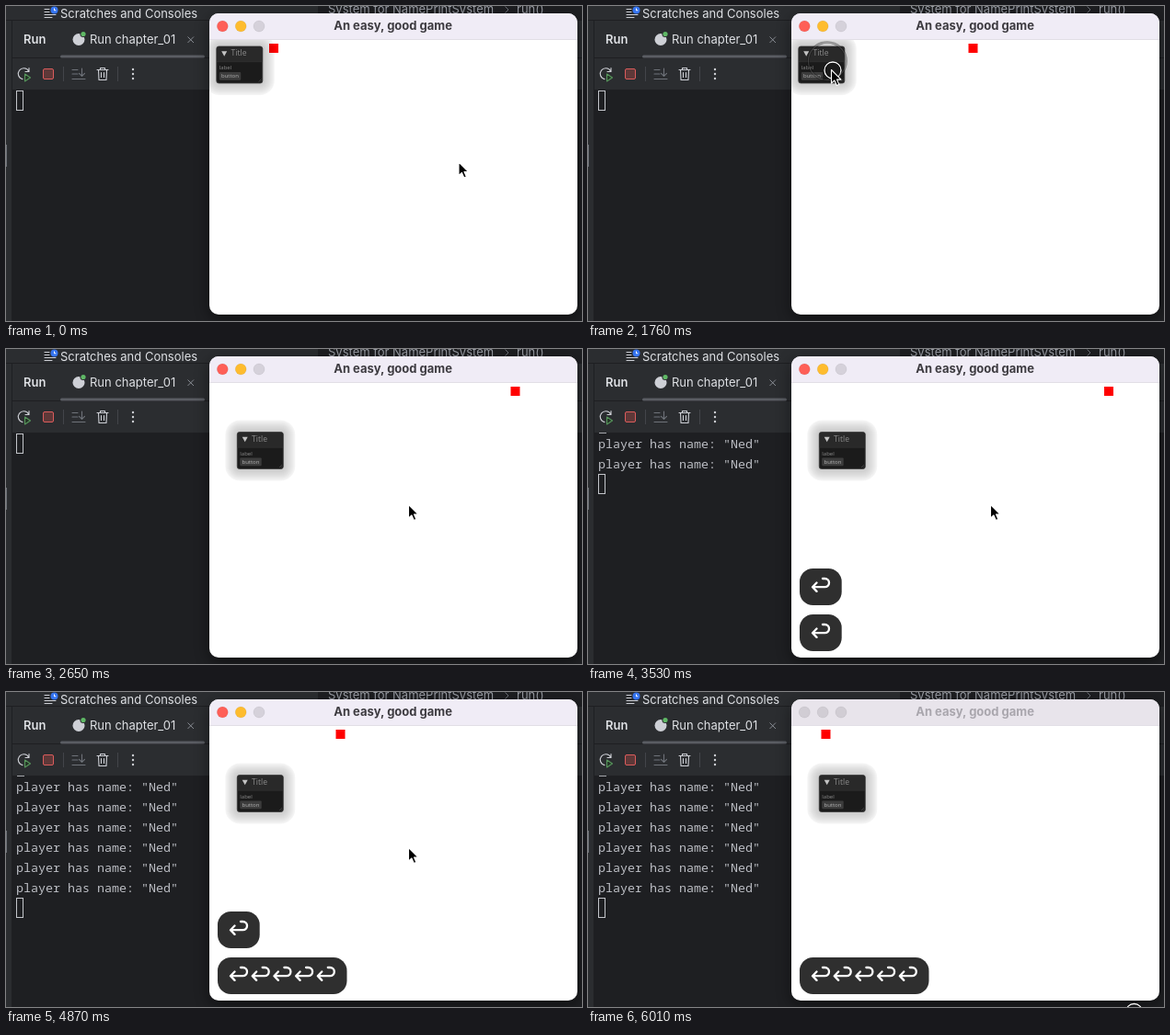
An HTML page for the animation above (6.03 s loop, 626 px wide and 343 px high).

```html
<!DOCTYPE html>
<html lang="en">
<head>
<meta charset="utf-8">
<title>An easy, good game</title>
<style>
html, body { margin: 0; width: 100%; height: 100%; overflow: hidden; background: #1e1f22; }
svg { display: block; width: 626px; height: 343px; }
text { font-family: Inter, "Open Sans", sans-serif; font-size: 13px; white-space: pre; }
.mono { font-family: "Noto Sans Mono", "DejaVu Sans Mono", monospace; font-size: 13.33px; fill: #bcbec4; }
.ui { font-family: "Open Sans", "Noto Sans", sans-serif; fill: #8c8c8c; }
.line { fill: none; stroke: #ced0d6; stroke-width: 1.1; stroke-linecap: round; stroke-linejoin: round; }
</style>
</head>
<body>
<svg viewBox="0 0 626 343" xmlns="http://www.w3.org/2000/svg">
  <defs>
    <clipPath id="content"><path d="M221 37H621V326a10 10 0 0 1-10 10H231a10 10 0 0 1-10-10Z"/></clipPath>
    <clipPath id="frame"><rect x="221" y="8" width="400" height="328" rx="10"/></clipPath>
    <filter id="soft" x="-10%" y="-10%" width="120%" height="125%"><feGaussianBlur stdDeviation="8"/></filter>
    <path id="return" class="key" d="M-4.5 -3L-9 1.7L-4.5 6.4M-8.4 1.7H4.4a4.6 4.6 0 0 0 0-9.2H2"
      fill="none" stroke="#fff" stroke-width="2.3" stroke-linecap="round" stroke-linejoin="round"/>
  </defs>

  <!-- IDE -->
  <rect width="626" height="343" fill="#1e1f22"/>
  <rect width="6" height="343" fill="#2b2d30"/>
  <rect width="339" height="15" fill="#2b2d30"/>
  <rect x="7" y="16" width="619" height="75" fill="#2b2d30"/>
  <rect y="15" width="626" height="1" fill="#1e1f22"/>
  <rect x="7" y="56" width="619" height="1" fill="#1e1f22"/>
  <rect y="151" width="1" height="24" fill="#6f737a"/>
  <g class="line">
    <path d="M42 3.5H47M42 6.5H47M42 9.5H54M42 12.5H50"/>
  </g>
  <circle cx="52.5" cy="4.5" r="4" fill="#3574f0"/>
  <path d="M52.5 2.5V4.8H54.3" fill="none" stroke="#fff"/>
  <text x="59" y="13" fill="#dfe1e5">Scratches and Consoles</text>
  <text x="350" y="7.5" fill="#9da0a8">System for NamePrintSystem</text>
  <path d="M542.5 .5L546 4L542.5 7.5" fill="none" stroke="#6f737a"/>
  <text x="555" y="7.5" fill="#9da0a8">run()</text>

  <text x="19" y="41" font-weight="600" fill="#dfe1e5">Run</text>
  <circle cx="79" cy="36.5" r="6.5" fill="#ced0d6"/>
  <circle cx="84" cy="30.5" r="3.6" fill="#2b2d30"/>
  <circle cx="84" cy="30.5" r="2.6" fill="#5fb865"/>
  <text x="91" y="41" fill="#dfe1e5">Run chapter_01</text>
  <path d="M197.5 33.5L204 40M204 33.5L197.5 40" stroke="#868a91" fill="none"/>
  <rect x="59" y="53.5" width="157" height="3" rx="1.5" fill="#5a5d63"/>

  <path class="line" d="M18 79.6A6 6 0 1 1 24.6 71M25 67.5V71.5H21"/>
  <path d="M20.5 74L26.5 78L20.5 82Z" fill="#253627" stroke="#57965c" stroke-width="1.1" stroke-linejoin="round"/>
  <rect x="40.5" y="68.5" width="11" height="11" rx="1.5" fill="#5e3838" stroke="#db5c5c"/>
  <path d="M62.5 66V82M121.5 66V82" stroke="#43454a"/>
  <path class="line" style="stroke:#6f737a" d="M72 69.5H78M72 74H78M72 79.5H86M82.5 68V76M79.5 73.3L82.5 76.3L85.5 73.3"/>
  <path class="line" d="M99 69.5H111M102.5 69.5V67.5H107.5V69.5M100.5 69.5L101 80.5H109L109.500 69.5M103.500 72.500V77.500M106.500 72.500V77.500"/>
  <g fill="#ced0d6"><circle cx="138" cy="69" r="1.2"/><circle cx="138" cy="74" r="1.2"/><circle cx="138" cy="79" r="1.2"/></g>
  <rect id="scrap" x="12" y="91" width="8" height="1" fill="#a5a7ac"/>
  <g id="log"></g>
  <rect id="caret" x="11.5" width="7" height="21" fill="none" stroke="#c4c6cb"/>

  <!-- game window -->
  <rect x="221" y="12" width="400" height="328" rx="10" fill="#000" opacity=".5" filter="url(#soft)"/>
  <g clip-path="url(#frame)">
    <rect x="221" y="8" width="400" height="328" fill="#fff"/>
    <rect id="bar" x="221" y="8" width="400" height="28.500"/>
    <rect x="221" y="36" width="400" height="1" fill="#e2dfe6"/>
  </g>
  <g id="lights" stroke="#000" stroke-opacity=".1" stroke-width=".6">
    <circle cx="235.300" cy="22" r="6"/><circle cx="255.200" cy="22" r="6"/><circle cx="275" cy="22" r="6"/>
  </g>
  <text id="title" x="420.600" y="26" font-weight="700" text-anchor="middle">An easy, good game</text>
  <g clip-path="url(#content)">
    <rect id="player" y="41" width="10" height="10" fill="#f00"/>
    <g id="panel">
      <g id="glow"></g>
      <rect x="228.800" y="44" width="50" height="40" rx="2.500" fill="#1b1b1b" stroke="#3a3a3a" stroke-width=".8"/>
      <path d="M229.200 60.500V46.500a2 2 0 0 1 2-2H276.400a2 2 0 0 1 2 2V60.500Z" fill="#292929"/>
      <path d="M229 60.700H278.500" stroke="#363636" stroke-width=".7"/>
      <path d="M234.200 49.300H240.200L237.200 54.700Z" fill="#c4c4c4"/>
      <text class="ui" x="244.500" y="54.400" style="font-size:8.600px">Title</text>
      <text class="ui" x="231.800" y="69.300" style="font-size:6px">label</text>
      <rect x="231.800" y="72" width="23.400" height="8.800" rx="1" fill="#3c3c3c"/>
      <text class="ui" x="234" y="78.400" style="font-size:6px;fill:#b4b4b4">button</text>
      <path d="M274.500 82.500L277.500 79.500M276.200 82.500L277.500 81.200" stroke="#555" stroke-width=".6"/>
    </g>
  </g>

  <!-- key and mouse overlays -->
  <g id="upper" transform="translate(230 239)"></g>
  <g id="lower" transform="translate(230 289)"></g>
  <g id="rings"></g>
  <path id="mouse" d="M0 0V14.600L3.400 11.500L5.800 17L8.300 15.900L6 10.600H10.500Z" fill="#000" stroke="#fff"
    stroke-width="1.100" stroke-linejoin="round"/>
</svg>
<script>
const LOOP = 6030;
const ticks = [0, 150, 290, 440, 590, 730, 880, 1030, 1170, 1320, 1470, 1610, 1760, 1910, 2060, 2210, 2360,
  2500, 2650, 2800, 2940, 3090, 3240, 3380, 3530, 3680, 3830, 3980, 4130, 4280, 4430, 4580,
  4730, 4870, 5020, 5170, 5320, 5470, 5610, 5760, 6010];
const playerPath = [[0, 286], [55, 286], [490, 221], [1030, 301], [1760, 413.5], [2650, 548.5],
  [3130, 621], [3530, 561], [4870, 358.5], [5785, 221], [6010, 253.5]];
const mousePath = [[0, 492, 170], [440, 492, 170], [730, 360, 92], [1030, 269, 28], [1170, 262, 20],
  [1320, 259, 38], [1610, 259, 59], [1760, 264.5, 69.5], [2060, 287, 116], [2360, 437.500, 169.500],
  [5320, 437.500, 169.500], [5610, 505, 250], [5760, 576, 332], [6010, 592, 348]];
const panelPath = [[1760, 0, 0], [2060, 22.500, 46.500]];
const presses = [2940, 3530, 3830, 4130, 4430, 4730];

const $ = id => document.getElementById(id);
const set = (el, attrs) => { for (const k in attrs) el.setAttribute(k, attrs[k]); };
const show = (el, on) => { el.style.display = on ? "" : "none"; };

function add(parent, tag, attrs) {
  const el = document.createElementNS("http://www.w3.org/2000/svg", tag);
  set(el, attrs);
  parent.appendChild(el);
  return el;
}

function along(path, t) {
  if (t <= path[0][0]) return path[0].slice(1);
  for (let i = 1; i < path.length; i++) {
    const a = path[i - 1], b = path[i];
    if (t <= b[0]) {
      const k = (t - a[0]) / (b[0] - a[0]);
      return a.slice(1).map((v, j) => v + (b[j + 1] - v) * k);
    }
  }
  return path[path.length - 1].slice(1);
}

for (let d = 13; d > 0; d--) {
  add($("glow"), "rect", { x: 228.8 - d, y: 44 - d, width: 50 + 2 * d, height: 40 + 2 * d,
    rx: 3 + d, fill: "#000", "fill-opacity": d === 13 ? 0.045 : 0.016 });
}

const lines = presses.map((_, i) => {
  const el = add($("log"), "text", { class: "mono", x: 11, y: 108 + 22 * i });
  el.textContent = 'player has name: "Ned"';
  return el;
});

function makeKeys(group, max) {
  const box = add(group, "rect", { height: 40, rx: 14.5, fill: "#2f2f2f" });
  const marks = Array.from({ length: max }, (_, i) =>
    add(group, "use", { href: "#return", x: 23 + 23.7 * i, y: 18.5 }));
  return (count, alpha = 1) => {
    show(group, count > 0 && alpha > 0);
    group.setAttribute("opacity", alpha);
    box.setAttribute("width", 45.7 + 23.7 * Math.max(0, count - 1));
    marks.forEach((m, i) => show(m, i < count));
  };
}
const drawUpper = makeKeys($("upper"), 1);
const drawLower = makeKeys($("lower"), 5);

function makeRing() {
  const g = add($("rings"), "g", { fill: "none" });
  const dark = add(g, "circle", { stroke: "#000", "stroke-opacity": 0.6, "stroke-width": 2.6 });
  const light = add(g, "circle", { stroke: "#fff", "stroke-width": 1.3 });
  return (on, x, y, r, alpha) => {
    show(g, on);
    g.setAttribute("opacity", alpha);
    for (const c of [dark, light]) set(c, { cx: x, cy: y, r });
    light.setAttribute("stroke-opacity", r > 12 ? 0.25 : 1);
  };
}
const drawPress = makeRing(), drawRelease = makeRing();

function draw(t) {
  const [mx, my] = along(mousePath, t);
  $("player").setAttribute("x", along(playerPath, t)[0]);
  $("mouse").setAttribute("transform", `translate(${mx} ${my})`);
  $("panel").setAttribute("transform", `translate(${along(panelPath, t)})`);

  const n = presses.filter(p => p <= t).length;
  lines.forEach((el, i) => show(el, i < n));
  show($("scrap"), n > 0);
  $("caret").setAttribute("y", 92.5 + 22 * n);
  drawUpper(n > 1 ? 1 : 0, Math.max(0, Math.min(1, (5320 - t) / 300)));
  drawLower(n > 1 ? n - 1 : n);

  const held = (t >= 1610 && t < 2210) || t >= 6010;
  drawPress(held, mx + 1.5, my + 0.5, 9, 1);
  const again = t >= 2210;
  drawRelease((t >= 1760 && t < 1910) || (again && t < 2360), again ? 288 : 260, again ? 116 : 60, 20.5, 0.65);

  const active = t < 6010;
  $("bar").setAttribute("fill", active ? "#f0ecf6" : "#e8e4eb");
  $("title").setAttribute("fill", active ? "#3d3b40" : "#a9a6ad");
  const colors = active ? ["#fe5f57", "#febc2e", "#d5d1da"] : Array(3).fill("#d1cdd4");
  [...$("lights").children].forEach((c, i) => c.setAttribute("fill", colors[i]));
}

const start = performance.now();
let last = -1;
function frame() {
  const t = (performance.now() - start) % LOOP;
  const tick = ticks.filter(s => s <= t).pop();
  if (tick !== last) draw(last = tick);
  requestAnimationFrame(frame);
}
frame();
</script>
</body>
</html>
```
